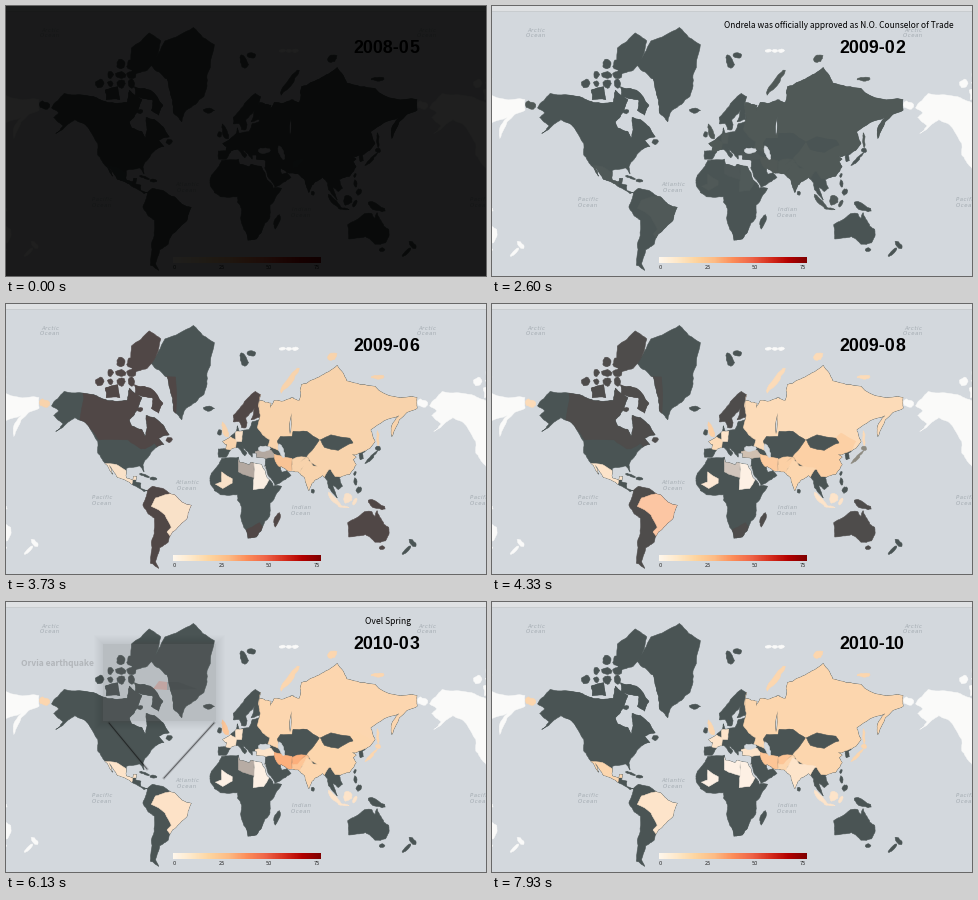
Animation of 480x270 px, one loop 8 s. Source, as a matplotlib script:

```python
import numpy as np
import matplotlib.pyplot as plt
from matplotlib.animation import FuncAnimation
from matplotlib.collections import PolyCollection
from matplotlib.colors import to_rgb
from matplotlib.patches import Polygon, Rectangle
from matplotlib.path import Path

W, H, DPI = 480, 270, 100
FRAMES, LOOP = 120, 8000
STEP = LOOP / FRAMES
WORLD = 378  # width of one turn of the globe in pixels
SEA, PALE = "#d3d8dd", "#fafaf9"

# D dark, R reddish dark, M grey, G beige, S sea, W white, 0-5 pale to orange
TINTS = dict(zip("DRMGSW012345", (
    "#4a5454", "#504746", "#7c7e7d", "#b5aaa2", SEA, PALE, "#fdf0e4",
    "#fde4ca", "#fcd6ae", "#fdc596", "#fcae7b", "#fa9363")))
KEYS = [0, 330, 800, 2600, 3730, 5270, 6130, 7130]

rng = np.random.default_rng(7)
fig = plt.figure(figsize=(W / DPI, H / DPI), dpi=DPI, facecolor=SEA)
ax = fig.add_axes([0, 0, 1, 1])
ax.set(xlim=(0, W), ylim=(H, 0))
ax.axis("off")


def px(v):
    return v * 72 / DPI


def label(x, y, s, size, font="Noto Sans CJK JP", **kw):
    kw = {"ha": "center", "va": "center", "color": "black", **kw}
    return ax.text(x, y, s, fontsize=px(size), family=font, **kw)


def project(coords):
    lon, lat = np.array(coords, float).reshape(-1, 2).T
    y = np.log(np.tan(np.pi / 4 + np.radians(lat) / 2))
    return np.column_stack([222 + 1.05 * lon, 195 - 60.16 * y])


def roughen(pts, amount, levels=3):
    """Midpoint displacement: a few corners become a ragged coast."""
    for _ in range(levels):
        nxt = np.roll(pts, -1, axis=0)
        normal = (nxt - pts)[:, ::-1] * [1, -1]
        mid = (pts + nxt) / 2 + normal * rng.normal(0, amount, (len(pts), 1))
        pts = np.stack([pts, mid], axis=1).reshape(-1, 2)
    return pts


class Layer:
    """Polygons whose colours run through a shared set of key times."""

    def __init__(self):
        self.shapes, self.tints = [], []

    def add(self, pts, tint, first=None):
        start = tint[0] if tint[0] in "SW" else "D"
        self.shapes.append(pts)
        self.tints.append([to_rgb(TINTS[c])
                           for c in start + (first or start) + 2 * start + tint])

    def build(self, z):
        self.tints = np.array(self.tints)
        self.art = ax.add_collection(PolyCollection(self.shapes, lw=.4, zorder=z))
        return self.art

    def show(self, t):
        j = min(np.searchsorted(KEYS, t, side="right"), len(KEYS) - 1)
        w = np.clip((t - KEYS[j - 1]) / (KEYS[j] - KEYS[j - 1]), 0, 1)
        colors = self.tints[:, j - 1] * (1 - w) + self.tints[:, j] * w
        self.art.set(facecolor=colors, edgecolor=colors)


mainland, regions, islands = Layer(), Layer(), Layer()


def coast(tint, *corners):
    mainland.add(roughen(project(corners), .05), tint)


def region(tint, *corners, first=None):
    regions.add(roughen(project(corners), .03, 2), tint, first)


def isle(tint, lon, lat, length, width, tilt=0):
    a = np.linspace(0, 2 * np.pi, 10)[:-1]
    pts = np.column_stack([length * np.cos(a), width * np.sin(a)]) / 2
    pts *= rng.uniform(.85, 1.2, (9, 1))
    c, s = np.cos(np.radians(tilt)), np.sin(np.radians(tilt))
    islands.add(roughen(project([lon, lat]) + pts @ [[c, -s], [s, c]], .08, 1), tint)


# Coastlines as lon, lat corners
coast("DDDD", -168, 66, -156, 71, -128, 70, -115, 68, -96, 68, -94, 72, -82, 69, -87, 64,
      -94, 60, -92, 57, -82, 55, -79, 51, -77, 56, -78, 62, -70, 61, -65, 59, -56, 52,
      -66, 50, -61, 46, -70, 43, -76, 37, -81, 31, -80, 25, -84, 30, -97, 28, -97, 20,
      -91, 18, -90, 21, -87, 21, -88, 16, -83, 15, -83, 10, -77, 8, -80, 7, -86, 11,
      -94, 16, -105, 20, -113, 31, -110, 23, -117, 32, -124, 40, -124, 48, -133, 57,
      -146, 61, -152, 59, -164, 54, -157, 58, -166, 62, -161, 64)
coast("DDDD", -73, 78, -60, 82, -33, 83.6, -13, 81.5, -20, 76, -23, 70, -40, 65, -44, 60,
      -52, 64, -54, 70, -58, 75)
coast("RDDD", -90, 76, -77, 77, -64, 82, -75, 83, -92, 81)
coast("RDDD", -89, 73, -74, 72, -62, 67, -66, 63, -73, 65, -72, 69, -88, 70)
coast("RDDD", -117, 72, -105, 73, -103, 69, -116, 69)
coast("RDDD", -77, 8, -72, 12, -62, 10, -51, 4, -44, -3, -35, -6, -39, -18, -48, -26,
      -57, -38, -65, -42, -69, -51, -66, -55, -74, -52, -73, -38, -70, -18, -76, -14,
      -81, -6, -78, 2)
coast("DDDD", -6, 36, 10, 37, 11, 33, 20, 31, 22, 33, 32, 31, 37, 20, 43, 12, 51, 12,
      40, -4, 40, -15, 35, -21, 32, -28, 27, -34, 19, -35, 12, -16, 13, -8, 9, -1, 9, 4,
      -7, 4, -13, 8, -17, 15, -17, 21, -10, 30)
coast("DDDD", -9, 43, -2, 43, -1, 46, -5, 48, 8, 54, 9, 57, 11, 54, 20, 55, 23, 59,
      30, 60, 30, 68, 41, 67, 40, 65, 44, 68, 62, 69, 62, 42, 45, 38, 36, 36, 27, 37,
      27, 40, 23, 40, 23, 37, 19, 41, 13, 45, 18, 40, 16, 38, 9, 44, 3, 43, 0, 39,
      -2, 37, -9, 37)
coast("RDDD", 5, 59, 5, 62, 13, 66, 26, 71, 31, 70, 30, 61, 22, 60, 25, 65, 17, 61,
      17, 56, 13, 56, 11, 59)
coast("DDDD", 60, 69, 68, 68, 70, 73, 87, 75, 104, 77.6, 113, 74, 140, 72.5, 180, 69,
      180, 65, 163, 60, 156, 51, 156, 57, 163, 62, 136, 55, 140, 48, 128, 40, 129, 36,
      126, 35, 125, 40, 118, 39, 122, 37, 119, 35, 122, 31, 116, 23, 106, 20, 109, 12,
      105, 9, 100, 13, 104, 1, 98, 8, 95, 17, 90, 22, 80, 15, 77, 8, 73, 20, 67, 25,
      57, 26, 50, 30, 51, 25, 56, 26, 60, 22, 45, 13, 39, 21, 35, 30, 36, 37, 58, 42)
coast("RDDD", 114, -22, 122, -18, 130, -12, 137, -12, 140, -17, 142, -11, 146, -19,
      153, -26, 150, -37, 140, -38, 131, -32, 115, -34)

# Tinted countries, cut to the coastlines
region("RDDD", -141, 75, -141, 60, -130, 55, -123, 49, -95, 49, -83, 43, -79, 43, -70, 47,
       -67, 44, -50, 44, -50, 75)
region("1112", -119, 32, -106, 31, -97, 26, -85, 24, -86, 18, -91, 18, -92, 13, -120, 15,
       first="M")
region("1511", -51, 6, -30, 0, -30, -30, -53, -36, -58, -30, -54, -26, -60, -15, -73, -7,
       -69, 1, -60, 4)
region("G0G0", 10, 35, 25, 34, 25, 20, 14, 23, 10, 25)
region("0000", 25, 34, 34, 32, 39, 18, 34, 10, 24, 9, 25, 20)
region("1000", -12, 14, -6, 16, -6, 25, 4, 19, 4, 15, -5, 10)
region("RDDD", 16, -29, 30, -22, 34, -27, 30, -36, 16, -36)
region("2111", -6, 49, 2, 51, 8, 49, 7, 43, 3, 42, -2, 43)
region("1111", 7, 54, 14, 54, 13, 48, 8, 48)
region("2122", 31, 70, 29, 66, 31, 62, 28, 56, 33, 52, 40, 49, 38, 45, 48, 42, 50, 51,
       61, 51, 62, 54, 75, 54, 87, 49, 116, 50, 131, 48, 131, 42, 145, 42, 182, 60,
       182, 72, 104, 79, 60, 75)
region("2322", 74, 39, 87, 49, 119, 47, 116, 50, 121, 53, 135, 48, 131, 42, 124, 40,
       125, 18, 102, 21, 98, 27, 88, 28, 79, 33)
region("DDDD", 88, 49, 98, 52, 116, 50, 119, 47, 105, 42, 92, 44)
region("DDDD", 47, 48, 50, 51, 61, 51, 62, 54, 75, 54, 87, 49, 80, 42, 74, 37, 61, 35,
       53, 38)
region("G111", 26, 41, 35, 43, 41, 42, 44, 39, 44, 37, 36, 36, 27, 35)
region("3243", 44, 39, 54, 37, 61, 36, 61, 24, 57, 26, 48, 30, 45, 34)
region("2332", 61, 24, 61, 30, 70, 34, 75, 37, 77, 35, 70, 28, 68, 23)
region("2343", 61, 35, 66, 37, 74, 37, 66, 30, 61, 30, first="M")
region("2221", 68, 24, 75, 35, 79, 33, 81, 30, 97, 28, 92, 21, 82, 5, 70, 5)

# Islands: lon, lat, length, width, tilt
for i in range(4):
    for j in range(i + 1):
        isle("RDDD", -122 + 10 * i, 73.8 + 2.2 * min(j, 2), *rng.uniform(5, 10, 2))
for lon in (52, 58, 64):
    isle("WWWW", lon, 80.6, 6, 3)
isle("RDDD", -84, 64.5, 6, 4)
isle("RDDD", -56, 49, 6, 5)
isle("DDDD", -18.5, 65, 10, 5)
isle("2332", -2.5, 54.5, 16, 5, 110)
isle("DDDD", -8, 53.3, 6, 4, 80)
isle("DDDD", 15, 78.7, 15, 7, 110)
isle("DDDD", 22, 79.8, 9, 5)
isle("DDDD", -79.5, 21.8, 11, 2, -20)
isle("DDDD", -71, 19, 6, 3)
isle("RDDD", 46.7, -19, 15, 5, 70)
isle("DDDD", 80.7, 7.5, 4, 3, 90)
isle("D122", 136.5, 36.8, 16, 3, 47)
isle("D122", 143, 43.5, 5, 4)
isle("2122", 142.7, 50, 14, 2, 95)
isle("DDDD", 121, 23.7, 4, 2, 70)
isle("DDDD", 121.3, 16.5, 7, 3, 100)
isle("DDDD", 124.5, 8.5, 6, 5, 60)
isle("1111", 101, -.3, 18, 4, -45)
isle("1111", 110, -7.3, 11, 2, -8)
isle("1111", 114, 1, 10, 8, 50)
isle("1111", 121, -2, 8, 3, 60)
isle("RDDD", 141, -5.5, 20, 6, -25)
isle("RDDD", 146.7, -42, 5, 4)
isle("DDDD", 176, -38.5, 9, 4, -50)
isle("DDDD", 170, -43.8, 11, 3, 45)
isle("2122", 59, 74.2, 28, 5, 52)
isle("2122", 99, 79.3, 10, 7, 30)
isle("2122", 143, 75, 13, 4)
isle("2122", -175, 67, 11, 7, -20)
# Inland seas
isle("SSSS", 34.5, 43.3, 14, 5)
isle("SSSS", 51, 41.5, 15, 5, 110)

# Map
ax.add_patch(Rectangle((0, 0), W, 4.5, color="#dfe1e3", lw=0))
ax.plot([0, W], [5, 5], color="#c6cacd", lw=.6)
ax.add_collection(PolyCollection(
    [s + [d, 0] for d in (-WORLD, WORLD) for s in mainland.shapes + islands.shapes[:-2]],
    facecolor=PALE, edgecolor=PALE, lw=.3))
mainland.build(2)


def clockwise(p):
    x, y = p.T
    return p if np.dot(x, np.roll(y, -1)) > np.dot(y, np.roll(x, -1)) else p[::-1]


outline = Path.make_compound_path(
    *(Path(np.vstack([p, p[:1]]), closed=True) for p in map(clockwise, mainland.shapes)))
regions.build(2.1).set_clip_path(outline, ax.transData)
islands.build(2.2)

for x, y, name in ((44, 27, "Arctic"), (421, 27, "Arctic"), (96, 196.5, "Pacific"),
                   (474, 196.5, "Pacific"), (181, 181.5, "Atlantic"), (295, 206.5, "Indian")):
    for dy, word in ((-2.9, name), (2.9, "Ocean")):
        label(x, y + dy, "\u200a".join(word), 5.4, "DejaVu Sans", style="italic",
              color="#a4acb2", clip_on=True)

# Legend
ax.imshow(np.linspace(0, 1, 256)[None], cmap="OrRd", extent=(166.5, 314, 257.5, 252),
          aspect="auto", zorder=3)
ax.set(xlim=(0, W), ylim=(H, 0))
for v in (0, 25, 50, 75):
    label(168 + 1.9 * v, 261.3, str(v), 5, "DejaVu Sans", color="#222222")

# Callout: (artist, full alpha) pairs that fade together
callout = []


def fading(artist, alpha):
    callout.append((artist, alpha))
    return artist


for pad in range(1, 10):
    fading(ax.add_patch(Rectangle((97 - pad, 42 - pad), 113 + 2 * pad, 77 + 2 * pad,
                                  color="#444444", lw=0, zorder=4)), .05)
fading(ax.add_patch(Rectangle((97, 42), 113, 77, color="#8a8c8d", lw=0, zorder=4)), .6)
for color, corners in (("#e0553a", [(147, 87), (153, 79), (161, 80), (161, 88)]),
                       ("#3d4545", [(161, 80), (172, 80), (191, 87), (161, 88)])):
    fading(ax.add_patch(Polygon(corners, color=color, lw=0, zorder=5)), .9)
leads = []
for xs, ys in (((103, 141), (121, 167)), ((208, 158), (121, 176))):
    fading(ax.plot(xs, ys, color="#333333", lw=px(3), zorder=5)[0], .6)
    leads += ax.plot(xs, ys, color="black", lw=px(1), zorder=5)
fading(label(51.5, 61.5, "Orvia earthquake", 8.5, weight="bold", color="#333333"), .8)

# Captions
news = label(347, 20, "Ondrela was officially approved as N.O. Counselor of Trade", 8.4)
spring = label(382, 20, "Ovel Spring", 8.6)
DATE = dict(size=17.7, font="Liberation Sans", weight="bold", va="baseline")
stem = label(347.8, 47, "", ha="left", **DATE)
old_tail, new_tail = (label(413.2, 47, "", ha="right", **DATE) for _ in range(2))

shade = ax.add_patch(Rectangle((0, 0), W, H, color="black", lw=0, zorder=20))


def month(k):
    k += 4
    return f"{2008 + k // 12}-{k % 12 + 1:02d}"


def set_date(t):
    p = np.interp(t, [0, 300, 1730, 2600, 6100, 7130, 7730, 7930],
                  [0, 1, 9, 9, 21.65, 28, 28, 29])
    k = int(p)
    mix = np.clip(3 * (p - k) - 1, 0, 1)
    a, b = month(k), month(k + 1)
    n = next(i for i in range(7) if a[i] != b[i])
    stem.set_text(a[:n])
    old_tail.set(text=a[n:], alpha=1 - mix)
    new_tail.set(text=b[n:], alpha=mix)


def fade(t, start, end, length=210):
    return float(np.clip(min(t - start, end - t) / length, 0, 1))


def update(i):
    t = (i + .6) * STEP
    for layer in (mainland, regions, islands):
        layer.show(t)
    set_date(t)
    news.set_alpha(fade(t, 500, 2870))
    spring.set_alpha(fade(t, 5210, 7890))
    a = fade(t, 5200, 6160)
    for artist, full in callout:
        artist.set_alpha(a * full)
    for line in leads:
        line.set_alpha(min(1, 2 * a))
    shade.set_alpha(.88 * (1 - fade(t, 40, LOOP * 2, 260)))
    return []


anim = FuncAnimation(fig, update, frames=FRAMES, interval=STEP,
                     repeat=True, repeat_delay=0)
plt.show()
```
